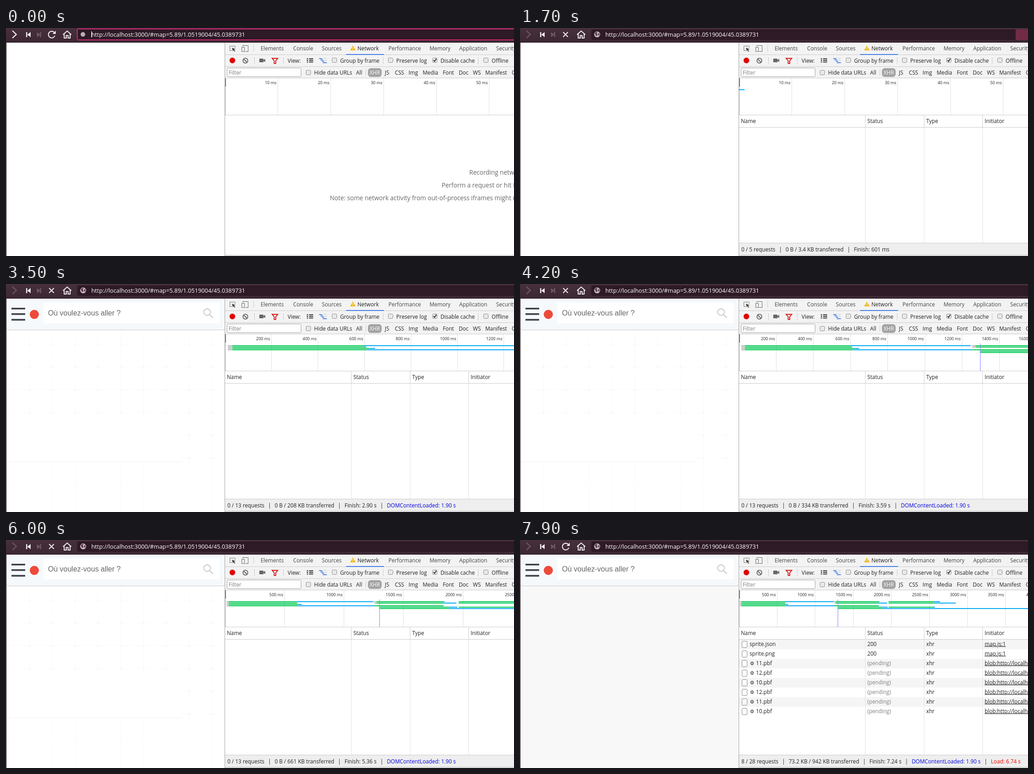
Recreate the animation shown at these times as an HTML page. Size 1113 by 499 pixels, loop 8 s.

```html
<!DOCTYPE html>
<html lang="en">
<head>
<meta charset="utf-8">
<title>Page load with network panel</title>
<style>
  html, body { margin: 0; width: 100%; height: 100%; overflow: hidden; background: #fff; }
  svg { display: block; width: 100vw; height: 100vh; }
  text { font: 11.75px "Open Sans", "Noto Sans", sans-serif; fill: #222; white-space: pre; }
  .url { font-size: 12.8px; fill: #fff; }
  .tick { font-size: 9px; text-anchor: end; }
  .hint { font-size: 13.6px; fill: #666; }
  .search { font: 16px "Liberation Sans", Arial, sans-serif; fill: #666; }
  .tab { fill: #444; }
  .pale { fill: #808080; }
  .link { text-decoration: underline; }
  .gear { font: 11px "DejaVu Sans", sans-serif; }
</style>
</head>
<body>
<svg viewBox="0 0 1113 499">
  <defs>
    <linearGradient id="chrome" x2="0" y2="1">
      <stop stop-color="#46303d"/><stop offset="1" stop-color="#3c2733"/>
    </linearGradient>
  </defs>
  <g id="back"></g>
  <g id="live"></g>
</svg>
<script>
const LOOP = 8000;
const INK = '#f2ecef', DIM = '#6d5864';

const REPAINTS = [[0, 0], [500, 700], [1300, 1700], [2100, 2300], [2800, 2800], [3100, 3500],
  [3700, 4200], [4400, 4600], [4800, 4800], [5100, 5100], [5300, 5600], [5800, 5800],
  [6000, 6000], [6200, 6300], [6500, 6600], [7000, 7500], [7700, 7700], [7900, 7900]];

// Each zoom step of the timeline widens its span by a quarter.
const ZOOMS = [[0, -14], [2100, -2], [2800, -1], [3100, 0], [3800, 1], [4400, 2], [5100, 3], [6200, 4], [7200, 5]];
const ELAPSED = [[1300, 200], [1700, 601], [2100, 1480], [3500, 2900], [5100, 4470], [7000, 6350], [7900, 7240]];
const KILOBYTES = [[1700, 3.4], [2100, 24], [3500, 208], [5100, 496], [7000, 844], [7500, 942]];

// lane, queued, sent, first byte, end (ms)
const REQUESTS = [
  [0, 12, 31, 599, 1247], [1, 12, 31, 605, 608], [2, 12, 31, 622, 646], [3, 12, 31, 610, 1253],
  [0, 1253, 1272, 1835, 1845], [1, 1253, 1272, 1830, 1944], [3, 1253, 1253, 1832, 1838],
  [4, 1296, 1296, 1881, 1953], [5, 1296, 1296, 1881, 9e3],
  [0, 1963, 1963, 2553, 2640], [1, 1963, 1963, 2577, 2846], [4, 1963, 1963, 2553, 2573]];
const FILES = ['sprite.json', 'sprite.png', '11.pbf', '12.pbf', '10.pbf', '12.pbf', '11.pbf', '10.pbf'];

const rect = (x, y, w, h, fill, more = '') =>
  `<rect x="${x}" y="${y}" width="${w}" height="${h}" fill="${fill}" ${more}/>`;
const text = (x, y, str, cls = '', more = '') => `<text x="${x}" y="${y}" class="${cls}" ${more}>${str}</text>`;
const stroke = (d, color, width = 1, more = '') =>
  `<path d="${d}" fill="none" stroke="${color}" stroke-width="${width}" ${more}/>`;
const shape = (d, fill) => `<path d="${d}" fill="${fill}"/>`;
const circle = (x, y, r, fill, more = '') => `<circle cx="${x}" cy="${y}" r="${r}" fill="${fill}" ${more}/>`;
const vline = (x, y, h, color = '#ccc') => rect(x, y, 1, h, color);
const hline = (x, y, w, color = '#ccc') => rect(x, y, w, 1, color);
const checkbox = (x, y) => rect(x + .5, y + .5, 10, 10, '#e9e9e9', 'rx="2" stroke="#8f8f8f"');
const labels = (y, cls, items) => items.map(([x, str]) => text(x, y, str, cls)).join('');
const latest = (list, t) => list.filter(([at]) => at <= t).pop();

function interpolate(points, t) {
  const next = points.findIndex(([at]) => at > t);
  if (next < 0) return points[points.length - 1][1];
  if (!next) return points[0][1];
  const [[t0, a], [t1, b]] = points.slice(next - 1, next + 1);
  return a + (b - a) * (t - t0) / (t1 - t0);
}

function drawToolIcons() {
  return stroke('M502 44V39.500H490.500V49.500H495', '#777') + shape('M495 43L503 46.500L499.600 47.800L502.500 51L501 52L498.400 48.800L497 51Z', '#444')
    + stroke('M518.500 41V38.500H530.500V51.500H524', '#666') + rect(516.5, 42.5, 6, 9, '#f3f3f3', 'stroke="#666"')
    + shape('M760 38.500L766 49H754Z', '#f4b400') + rect(759.4, 42, 1.3, 4, '#fff') + rect(759.4, 46.8, 1.3, 1.2, '#fff')
    + circle(496, 71, 7.2, '#f5c8c8') + circle(496, 71, 6, '#e00000')
    + circle(524.5, 71.5, 5.3, 'none', 'stroke="#666" stroke-width="1.800"') + stroke('M521 68L528 75', '#666', 1.8)
    + rect(555, 67, 9, 8, '#666') + shape('M564 70L568 67.500V74.500L564 72Z', '#666')
    + stroke('M583 66.500H595.500L591 71.500V77.500H587.500V71.500Z', '#d81010', 1.8)
    + [66, 70, 74].map((y, i) => rect(659, y, 3, i < 2 ? 3 : 2, '#666') + rect(664, y, 9, i < 2 ? 3 : 2, '#666')).join('')
    + [[686, 66, 7], [689, 69, 6], [692, 72, 5], [694, 75, 9]].map(([x, y, w]) => rect(x, y, w, 1.7, '#3b78e7')).join('')
    + rect(695, 66, 8, 1, '#bcd') + rect(697, 70, 6, 1, '#bcd');
}

function drawBack() {
  let s = rect(0, 0, 1113, 32, 'url(#chrome)') + rect(0, 31, 1113, 1, '#28131f') + rect(0, 31, 1, 468, '#28131f');
  s += rect(44, 9, 2.5, 11, INK) + shape('M54 9V20L46.500 14.500Z', INK);
  s += shape('M68 9V20L75 14.500Z', DIM) + rect(74.5, 9, 2.5, 11, DIM);
  s += stroke('M125 14.500L134 6.500L143 14.500M127.500 13V22H132V16.500H136V22H140.500V13', INK, 2);

  s += rect(479, 32, 634, 467, '#fff') + rect(480, 32, 633, 78, '#f3f3f3');
  s += [58, 84, 109].map(y => hline(480, y, 633)).join('');
  s += vline(542, 37, 15) + [544, 607, 826, 1034].map(x => vline(x, 64, 15)).join('') + vline(788, 90, 15);
  s += drawToolIcons();
  s += labels(49, 'tab', [[558, 'Elements'], [629, 'Console'], [692, 'Sources'], [838, 'Performance'],
    [928, 'Memory'], [993, 'Application'], [1074, 'Security']]);
  s += text(770, 49, 'Network') + rect(745, 57, 83, 2, '#4580e6');
  s += labels(76, '', [[617, 'View:'], [732, 'Group by frame'], [855, 'Preserve log'], [952, 'Disable cache'], [1064, 'Offline']]);
  s += [714, 837, 934, 1046].map(x => checkbox(x, 65)).join('') + stroke('M936.500 70.500L939 73L943 67', '#333', 2);
  s += rect(484.5, 87.5, 162, 19, '#fff', 'rx="2" stroke="#a3a3a3"') + text(488, 102, 'Filter', 'pale') + checkbox(657, 92);
  s += rect(793, 88, 30, 19, '#a3a3a3', 'rx="6"') + text(796.5, 102, 'XHR', '', 'style="fill:#fff"');
  s += labels(102, '', [[675, 'Hide data URLs'], [767, 'All'], [830, 'JS'], [852, 'CSS'], [882, 'Img'], [913, 'Media'],
    [957, 'Font'], [992, 'Doc'], [1023, 'WS'], [1050, 'Manifest'], [1108, 'Other']]);
  s += hline(480, 190, 633) + hline(480, 497, 633, '#aaa') + vline(479, 32, 467, '#a3a3a3');
  return s;
}

function drawAddressBar(t) {
  const focused = t < 500, loading = t >= 600 && t < 7400;
  let s = stroke('M14 6L22.500 14L14 22', t < 1300 ? INK : DIM, 2.4);
  s += loading ? stroke('M94.500 9L105 19.500M105 9L94.500 19.500', INK, 2.1)
    : stroke('M106 10A7.300 7.300 0 1 0 107 17', INK, 2.1) + shape('M109 6V13H102Z', INK);
  s += focused ? rect(156, 2, 970, 24, '#2e1a26', 'rx="4" stroke="#cb2a70" stroke-width="2"')
    : rect(156, 3, 970, 23, '#2e1a26', 'rx="4"');
  if (t >= 600 && t < 2800) {
    const left = t < 1300 ? 156 : 156 + 930 * (1 - ((1700 - t) / 500) ** 2);
    s += rect(left, 3, 1126 - left, 23, '#722b45', `rx="${t < 1300 ? 4 : 0}" opacity="${t < 700 ? .5 : 1}"`);
  }
  s += focused ? circle(168.5, 14, 5, '#b9aeb5') + vline(187, 7, 14, '#fff')
    : circle(169, 14, 6.5, '#c9bcc4') + shape('M164 11Q167 8 170 9L168 12L170 14L168 18L165 15ZM171 12L174 11V16L171.500 17Z', '#5d3c4c');
  return s + text(187, 18.5, 'http://localhost:3000/#map=5.89/1.0519004/45.0389731', 'url');
}

function drawPage(t) {
  const loaded = t >= 7400;
  let s = rect(1, 32, 478, 467, loaded ? '#f8f8f8' : '#fff');
  if (t < 2800) return s;
  if (t >= 3200 && !loaded) {
    for (let x = 51; x < 479; x += 50) {
      s += x < 390 ? vline(x, 101, 190, '#fbfbfb') + vline(x, 390, 109, '#fafafa') : vline(x, 101, 398, '#fbfbfb');
      for (let y = 131; y < 400; y += 50) {
        const blank = x < 390 && y > 290;
        if (!blank) s += rect(x - 1, y - 1, 3, 3, '#f0f0f0');
      }
    }
    for (let y = 131; y < 499; y += 50) s += y > 290 && y < 390 ? hline(385, y, 94, '#fbfbfb') : hline(1, y, 478, '#fbfbfb');
    s += hline(1, 389, 384, '#f0f0f0');
  }
  s += shape('M1 32H479V97Q479 101 475 101H5Q1 101 1 97Z', '#c9c9c9') + shape('M1 32H479V96Q479 100 475 100H5Q1 100 1 96Z', '#f6f9fc');
  s += rect(82, 41, 386, 45, '#fff') + [52, 64, 76.5].map(y => rect(12, y, 30, 3.6, '#3c4049')).join('');
  s += text(92, 69, 'Où voulez-vous aller ?', 'search');
  if (t >= 3100) {
    s += circle(62, 66.5, 10, '#ee4a3a');
    s += circle(440.5, 61.5, 7.2, 'none', 'stroke="#aaa" stroke-width="1.200"') + stroke('M446 67L453 74', '#aaa', 1.3);
  }
  return s;
}

function drawTimeline(t, elapsed) {
  const msPerPx = at => 1.9643 * 1.25 ** latest(ZOOMS, Math.max(0, at))[1];
  const gridScale = msPerPx(t - 100), scale = msPerPx(t);
  const step = [10, 20, 50, 100, 200, 500, 1000].find(ms => ms / gridScale >= 64);
  let s = vline(480, 110, 80, '#bbb') + rect(480, 110, 2, 18, '#808080');
  for (let i = 1; i < 14; i++) {
    const x = Math.floor(480 + i * step / gridScale);
    s += vline(x, 110, 80, '#e0e0e0') + text(x - 2.5, 123, `${i * step} ms`, 'tick');
  }
  if (t < 1500) return s;
  const bar = (lane, from, to, color) => {
    const end = Math.min(to, elapsed);
    return end > from ? rect(480 + from / scale, 134 + lane * 3, (end - from) / scale, 2, color) : '';
  };
  s += bar(0, 0, 1.05, '#03a9f4');
  if (t < 2100) return s;
  for (const [lane, queued, sent, firstByte, end] of REQUESTS) {
    s += bar(lane, queued, sent, '#b5b5b5') + bar(lane, sent, firstByte, '#00c853') + bar(lane, firstByte, end, '#03a9f4');
  }
  if (t >= 2800) s += vline(Math.floor(480 + 1297 / scale), 130, 60, t >= 6200 && t < 7200 ? '#777' : '#8080ff');
  return s;
}

function drawTable(t, elapsed) {
  if (t < 1400) return labels(321, 'hint', [[1015, 'Recording network activity…']])
    + labels(349, 'hint', [[954.5, 'Perform a request or hit F5 to record the reload.']])
    + labels(377, 'hint', [[709.5, 'Note: some network activity from out-of-process iframes might not be shown.']]);

  const rows = t >= 7700 ? 8 : t >= 7500 ? 2 : 0, done = t >= 7900;
  let s = '';
  FILES.slice(0, rows).forEach((name, i) => {
    const y = 218 + 21 * i, base = y + 13.5, tile = i > 1;
    if (i % 2 === 0) s += rect(480, y, 633, 21, '#f5f5f5');
    s += rect(486.5, y + 3.5, 11, 14, '#fff', 'rx="1" stroke="#888"');
    if (tile) s += text(503.5, base, '⚙', 'gear');
    s += text(tile ? 517 : 503, base, name);
    s += done && !tile ? text(761, base, '200') : text(761, base, '(pending)', 'pale');
    s += text(890, base, 'xhr') + text(1018, base, tile ? 'blob:http://localhost:3000' : 'map.js:1', 'link');
  });
  s += [756, 885, 1013].map(x => vline(x, 191, 27) + vline(x, 218, 252, '#e0e0e0')).join('') + hline(480, 217, 633);
  s += labels(208, '', [[484, 'Name'], [761, 'Status'], [890, 'Type'], [1018, 'Initiator']]);
  return s + drawSummary(t, elapsed, rows, done);
}

function drawSummary(t, elapsed, rows, done) {
  const total = t < 1600 ? 2 : t < 2200 ? 5 : t < 2800 ? 9 : t < 7500 ? 13 : t < 7700 ? 22 : 28;
  const kb = interpolate(KILOBYTES, t);
  const finish = elapsed < 1000 ? `${Math.round(elapsed)} ms` : `${(elapsed / 1000).toFixed(2)} s`;
  const parts = [`${rows} / ${total} requests`,
    `${done ? '73.2 KB' : '0 B'} / ${kb.toFixed(kb < 10 ? 1 : 0)} KB transferred`, `Finish: ${finish}`];
  if (t >= 2800) parts.push('<tspan fill="#0000e6">DOMContentLoaded: 1.90 s</tspan>');
  if (t >= 7400) parts.push('<tspan fill="#f00000">Load: 6.74 s</tspan>');
  const joined = parts.map((part, i) => i ? `<tspan dx="8">|</tspan><tspan dx="8">${part}</tspan>` : part).join('');
  return rect(480, 470, 633, 27, '#eee') + hline(480, 470, 633) + text(485, 489, joined);
}

const live = document.getElementById('live');
document.getElementById('back').innerHTML = drawBack();
let shown = -1;

function play(now) {
  const time = now % LOOP;
  const [from, to] = latest(REPAINTS, time);
  const t = Math.max(from, Math.min(to, Math.floor(time / 100) * 100));
  if (t !== shown) {
    shown = t;
    const elapsed = interpolate(ELAPSED, t);
    live.innerHTML = drawAddressBar(t) + drawPage(t) + drawTimeline(t, elapsed) + drawTable(t, elapsed);
  }
  requestAnimationFrame(play);
}
play(performance.now());
</script>
</body>
</html>
```
